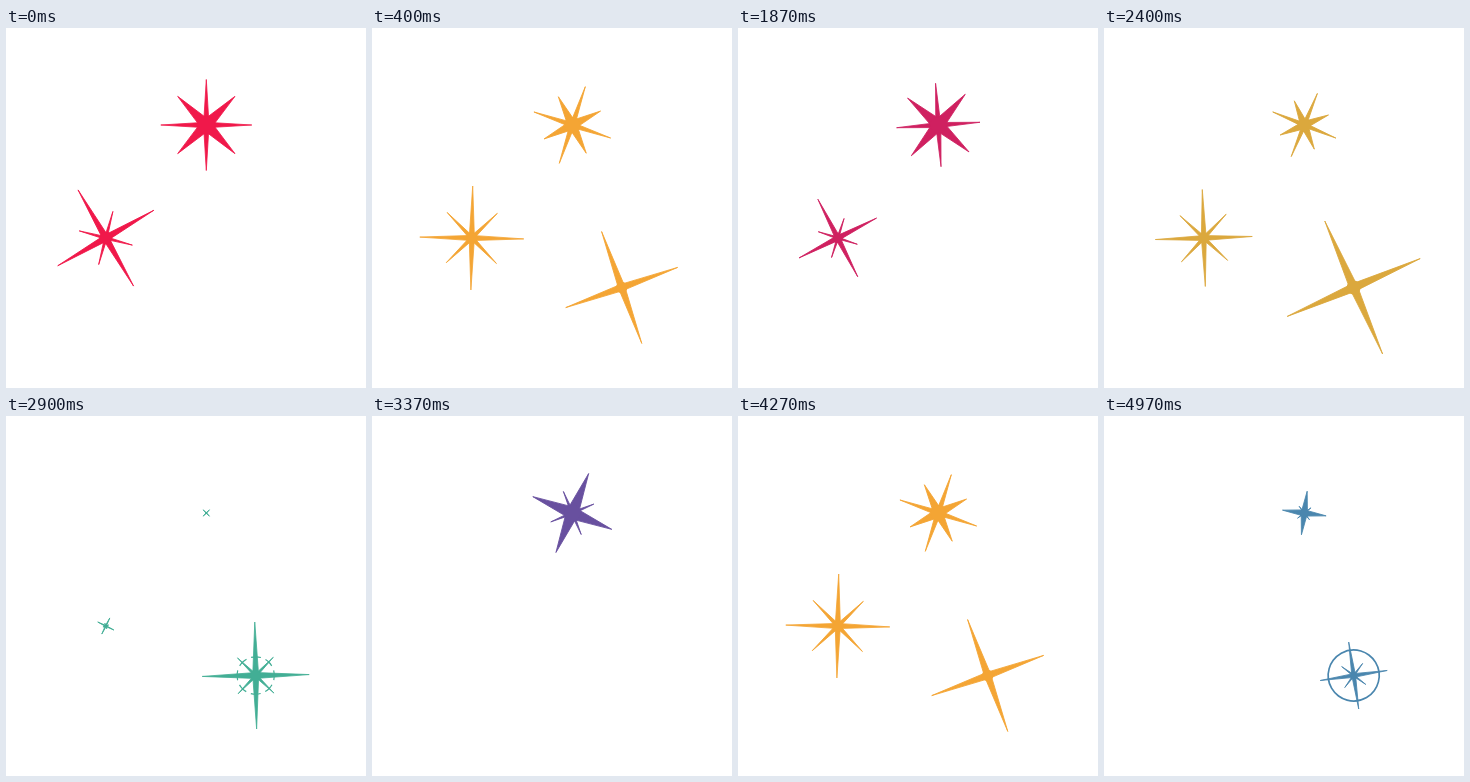
Write an HTML page with a canvas that moves like this. It is 360x360 px and loops after 5.07 s.

```html
<!DOCTYPE html>
<html>
<head>
<meta charset="utf-8">
<title>Sparkles</title>
<style>
  html, body { margin: 0; width: 100%; height: 100%; overflow: hidden; background: #fff; }
  canvas { display: block; width: 100vmin; height: 100vmin; }
</style>
</head>
<body>
<canvas id="stage" width="360" height="360"></canvas>
<script>
const ctx = document.getElementById('stage').getContext('2d');
const LOOP_MS = 5070, CYCLE = 24, TAU = 2 * Math.PI;

// Each star turns steadily while two crosses, 45 degrees apart, swell and shrink.
// A cross is a list of [step, arm length]; it wraps after one cycle.
const stars = [
  { x: 200.3, y: 97, angle: 0, spin: 3.75, core: .19, widths: [.06, .14], crosses: [
    [[11, 3], [14, 9], [24, 46], [29, 41]],
    [[11, 0], [12, 1], [16, 44], [24, 41], [29, 32]]] },
  { x: 99.8, y: 210, angle: -30, spin: -2.8, core: .11, widths: [.055, .05], crosses: [
    [[13, 0], [19.3, 0], [24, 56], [29, 36], [35, 19]],
    [[13, 0], [20, 0], [24, 28], [28, 56], [32, 42], [35, 7]]] },
  { x: 249.7, y: 259.5, angle: -1, spin: -3.75, core: .095, widths: [.055, .055], ring: true, crosses: [
    [[.4, 0], [6, 73], [11, 31], [17, 0]],
    [[6, 0], [11, 50], [12, 54], [17.5, 0]]] }
];

const colors = { 0: 'f0184a', 5: 'f4a534', 11: '5bb46a', 12: '42ae95', 14: '4a86ae', 18: '68509f', 23: 'cf2060' };
const palette = Object.entries(colors)
  .map(([step, hex]) => [+step, ...hex.match(/../g).map(h => parseInt(h, 16))]);

// Linear interpolation between key points, repeating every cycle.
function sample(keys, step) {
  const [first, ...values] = keys[0];
  const at = first + (step - first + CYCLE) % CYCLE;
  const all = [...keys, [first + CYCLE, ...values]];
  const i = all.findIndex(key => key[0] > at), a = all[i - 1], b = all[i];
  const mix = (at - a[0]) / (b[0] - a[0]);
  return a.slice(1).map((v, j) => v + (b[j + 1] - v) * mix);
}

function drawCross(length, halfWidth, turn) {
  if (length < 1) return;
  for (let i = 0; i < 4; i++) {
    ctx.save();
    ctx.rotate(turn + i * TAU / 4);
    ctx.beginPath();
    ctx.moveTo(0, -halfWidth);
    ctx.lineTo(length - .5, 0);
    ctx.lineTo(0, halfWidth);
    ctx.closePath();
    ctx.fill();
    ctx.stroke();
    ctx.restore();
  }
}

// The ring grows outwards while eight arcs close up into a full circle.
function drawRing(step, turn) {
  const radius = 15.3 + (step - 11) * 3.4;
  const arc = TAU * radius / 8, dash = arc * Math.min(1, (step - 10) / 3);
  ctx.save();
  ctx.rotate(turn);
  ctx.lineWidth = Math.min(1.7, (step - 9) * .4);
  ctx.setLineDash([dash, arc - dash]);
  ctx.lineDashOffset = dash / 2;
  ctx.beginPath();
  ctx.arc(0, 0, radius, 0, TAU);
  ctx.stroke();
  ctx.restore();
}

function drawStar(star, step) {
  // Count from the gap in which a star is hidden, so its turn has no visible jump.
  const turns = step > 18 ? step - CYCLE : step;
  const turn = (star.angle + star.spin * turns) * TAU / 360;
  const lengths = star.crosses.map(keys => sample(keys, step)[0]);
  ctx.save();
  ctx.translate(star.x, star.y);
  lengths.forEach((length, i) => drawCross(length, length * star.widths[i], turn + i * TAU / 8));
  ctx.beginPath();
  ctx.arc(0, 0, star.core * Math.max(...lengths), 0, TAU);
  ctx.fill();
  if (star.ring && step > 10 && step < 17) drawRing(step, turn);
  ctx.restore();
}

function draw(time) {
  // Artwork runs at 12.5 steps a second, shown on a 30 Hz grid.
  const tick = Math.floor((time % LOOP_MS) * .03 + .15);
  const step = Math.floor(Math.min(tick, 151) * 5 / 12) % CYCLE;
  ctx.clearRect(0, 0, 360, 360);
  ctx.fillStyle = ctx.strokeStyle = `rgb(${sample(palette, step).map(Math.round)})`;
  ctx.lineWidth = .8;
  ctx.lineJoin = 'round';
  stars.forEach(star => drawStar(star, step));
}

let start;
function frame(now) {
  start ??= now;
  draw(now - start);
  requestAnimationFrame(frame);
}
draw(0);
requestAnimationFrame(frame);
</script>
</body>
</html>
```
